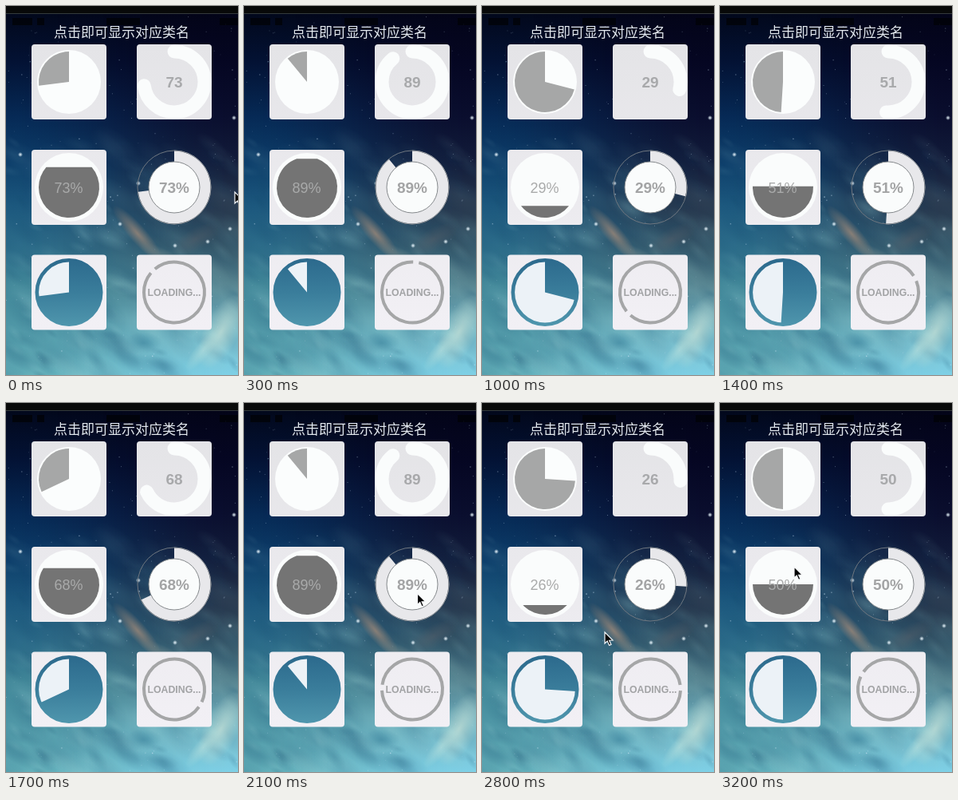
Write an HTML page with a canvas that moves like this. It is 291x462 px and loops after 3.3 s.

```html
<!DOCTYPE html>
<html lang="zh-CN">
<head>
<meta charset="utf-8">
<style>
  html, body { margin: 0; width: 100%; height: 100%; overflow: hidden; background: #04132c; }
  canvas { display: block; }
</style>
</head>
<body>
<canvas id="stage" width="291" height="462"></canvas>
<script>
const W = 291, H = 462, TAU = Math.PI * 2, TOP = -Math.PI / 2, LOOP = 3300;
const SANS = '"Liberation Sans", Arial, sans-serif';
const LEFT = 79, RIGHT = 211, ROWS = [95, 227, 358.5];
const ctx = document.getElementById('stage').getContext('2d');
const sky = document.createElement('canvas');
sky.width = W;
sky.height = H;

// time, progress in percent (unwrapped), spinner gap in degrees (unwrapped)
const GAUGE = [
  [0, 73, 225], [500, 100, 912], [1000, 129, 1576], [1700, 168, 2550],
  [2300, 200, 3320], [2800, 226, 3957], [3200, 250, 4530]
];
// time, pointer tip x, y
const POINTER = [
  [0, 287, 233], [100, 300, 232], [1800, 300, 232], [2000, 225, 238],
  [2200, 210, 239], [2500, 210, 239], [2800, 154, 287], [3200, 93, 205]
];
// y, then red, green, blue at the left edge and at the right edge
const SKY = [
  [10, 2, 8, 28, 3, 4, 24],
  [70, 3, 18, 52, 5, 6, 34],
  [140, 6, 42, 86, 10, 14, 46],
  [195, 13, 62, 106, 18, 28, 58],
  [250, 28, 88, 126, 38, 54, 76],
  [300, 44, 108, 138, 52, 84, 102],
  [350, 64, 134, 152, 88, 134, 146],
  [405, 80, 152, 167, 118, 184, 198],
  [462, 98, 174, 184, 126, 208, 230]
];

function sample(keys, t) {
  let i = 1;
  while (i < keys.length - 1 && keys[i][0] <= t) i++;
  const a = keys[i - 1], b = keys[i];
  const k = Math.min(1, (t - a[0]) / (b[0] - a[0]));
  return a.slice(1).map((v, n) => v + (b[n + 1] - v) * k);
}

function ramp(c, y0, y1, stops) {
  const g = c.createLinearGradient(0, y0, 0, y1);
  stops.forEach(([at, color]) => g.addColorStop(at, color));
  return g;
}

function paintSky() {
  const c = sky.getContext('2d');
  let seed = 11;
  const rnd = () => (seed = seed * 16807 % 2147483647) / 2147483647;

  function glow(x, y, rx, ry, tilt, rgb, alpha) {
    c.save();
    c.translate(x, y);
    c.rotate(tilt);
    c.scale(rx, ry);
    const g = c.createRadialGradient(0, 0, 0, 0, 0, 1);
    g.addColorStop(0, `rgba(${rgb},${alpha})`);
    g.addColorStop(0.5, `rgba(${rgb},${alpha * 0.5})`);
    g.addColorStop(1, `rgba(${rgb},0)`);
    c.fillStyle = g;
    c.fillRect(-1, -1, 2, 2);
    c.restore();
  }

  for (let x = 0; x < W; x++) {
    const u = x / W, k = u * u * (3 - 2 * u);
    c.fillStyle = ramp(c, 0, H, SKY.map(([y, ...v]) =>
      [y / H, `rgb(${[0, 1, 2].map(i => Math.round(v[i] + (v[i + 3] - v[i]) * k))})`]));
    c.fillRect(x, 0, 1, H);
  }

  // mottled clouds, stronger towards the bottom
  for (let i = 0; i < 220; i++) {
    const y = 170 + rnd() * 300, depth = (y - 150) / 320, size = 6 + rnd() * 20;
    glow(rnd() * W, y, size * 1.7, size * 0.7, 0.2 + rnd() * 0.8,
      rnd() < 0.5 ? '150,205,210' : '16,72,108', 0.06 + depth * 0.12);
  }
  glow(165, 285, 46, 11, 0.85, '165,140,122', 0.75);
  glow(205, 318, 45, 10, 0.5, '130,145,142', 0.5);
  glow(238, 292, 34, 14, -0.5, '92,96,104', 0.45);
  glow(172, 422, 24, 14, 0, '62,135,160', 0.6);
  glow(270, 408, 22, 50, 0.45, '205,230,218', 0.7);
  glow(248, 430, 10, 34, 0.7, '190,228,222', 0.5);

  for (let i = 0; i < 210; i++) {
    const x = rnd() * W, y = 12 + rnd() * (H - 14), s = rnd() < 0.15 ? 1.4 : 0.8;
    c.fillStyle = `rgba(205,228,245,${0.15 + rnd() * 0.5})`;
    c.fillRect(x, y, s, s);
  }
  [[286, 140], [281, 279], [212, 300], [143, 273], [166, 222], [253, 295], [18, 186]]
    .forEach(([x, y]) => glow(x, y, 3, 3, 0, '235,248,255', 1));

  c.fillStyle = '#080909';
  c.fillRect(0, 0, W, 9);
  c.fillStyle = '#343a3c';
  c.fillRect(0, 9, W, 1);
  c.fillStyle = 'rgba(0,2,6,.75)';
  [[8, 25], [39, 9], [126, 42], [268, 23]].forEach(([x, w]) => c.fillRect(x, 15, w, 9));
}

function card(x, y) {
  box(x - 47, y - 47, 94, 94, ramp(ctx, 48, 405, [[0, '#e4e4e7'], [1, '#f2f0f5']]));
}

function box(x, y, w, h, color) {
  ctx.beginPath();
  ctx.roundRect(x, y, w, h, 4);
  ctx.fillStyle = color;
  ctx.fill();
}

function disc(x, y, r, color) {
  ctx.beginPath();
  ctx.arc(x, y, r, 0, TAU);
  ctx.fillStyle = color;
  ctx.fill();
}

function sector(x, y, r, from, to, color) {
  ctx.beginPath();
  ctx.moveTo(x, y);
  ctx.arc(x, y, r, from, to);
  ctx.closePath();
  ctx.fillStyle = color;
  ctx.fill();
}

function arc(x, y, r, from, to, width, color, cap = 'butt') {
  ctx.beginPath();
  ctx.arc(x, y, r, from, to);
  ctx.lineWidth = width;
  ctx.lineCap = cap;
  ctx.strokeStyle = color;
  ctx.stroke();
}

function label(text, x, baseline, font, color) {
  ctx.font = font;
  ctx.textAlign = 'center';
  ctx.fillStyle = color;
  ctx.fillText(text, x, baseline);
}

function pie(x, y, end) {
  card(x, y);
  disc(x, y, 40, '#fbfdfd');
  sector(x, y, 38, end, TOP + TAU, '#a6a7a7');
}

function loop(x, y, end, percent) {
  card(x, y);
  arc(x, y, 38, TOP, end + 0.001, 17, '#fafcfc', 'round');
  label(percent, x, y + 7, `bold 19px ${SANS}`, '#a8a9ab');
}

function ball(x, y, p, percent) {
  card(x, y);
  disc(x, y, 43, '#fafcfc');
  ctx.beginPath();
  ctx.arc(x, y, 38, Math.PI * (0.5 - p), Math.PI * (0.5 + p));
  ctx.fillStyle = '#747474';
  ctx.fill();
  label(percent + '%', x - 0.5, y + 6.5, `18px ${SANS}`, '#a9aaaa');
}

function pieLoop(x, y, end, percent) {
  arc(x, y, 46, 0, TAU, 1, '#6f7780');
  sector(x, y, 45.5, TOP, end, '#e8e8eb');
  arc(x, y, 46, TOP, end, 1, '#8d9298');
  disc(x, y, 32, '#fafcfc');
  arc(x, y, 32, 0, TAU, 1, '#85898c');
  label(percent + '%', x, y + 7, `bold 19px ${SANS}`, '#a3a4a5');
}

function transparentPie(x, y, end) {
  card(x, y);
  const blue = ramp(ctx, y - 42, y + 42, [[0, '#2c6a8d'], [0.5, '#3a7d9b'], [1, '#4f96ad']]);
  disc(x, y, 39, '#ecf2f7');
  arc(x, y, 40.2, 0, TAU, 4.6, blue);
  sector(x, y, 39, TOP, end, blue);
}

function spinner(x, y, degrees) {
  card(x, y);
  const gap = degrees * Math.PI / 180, half = 0.03 * Math.PI;
  arc(x, y, 38, gap + half, gap - half + TAU, 4, '#a5a6a7');
  label('LOADING...', x, y + 4.5, `bold 12.3px ${SANS}`, '#a2a3a5');
}

function pointer(x, y) {
  ctx.save();
  ctx.translate(x, y);
  ctx.beginPath();
  [[0, 0], [0, 14], [3.2, 11], [5.6, 16.4], [8, 15.4], [5.6, 10.2], [10, 10]]
    .forEach(([px, py]) => ctx.lineTo(px, py));
  ctx.closePath();
  ctx.fillStyle = '#050505';
  ctx.fill();
  ctx.lineWidth = 1.2;
  ctx.strokeStyle = '#f4f6f8';
  ctx.stroke();
  ctx.restore();
}

function draw(now) {
  const t = Math.floor(now % LOOP / 100) * 100;
  const [total, gap] = sample(GAUGE, t);
  const percent = Math.round(total) % 100, p = percent / 100, end = TOP + p * TAU;

  ctx.drawImage(sky, 0, 0);
  label('点击即可显示对应类名', 145, 38.5, '17px "Noto Sans CJK SC", "Noto Sans CJK", sans-serif', '#e4e9ee');
  pie(LEFT, ROWS[0], end);
  loop(RIGHT, ROWS[0], end, percent);
  ball(LEFT, ROWS[1], p, percent);
  pieLoop(RIGHT, ROWS[1], end, percent);
  transparentPie(LEFT, ROWS[2], end);
  spinner(RIGHT, ROWS[2], gap);

  if (t >= 2200 && t < 2700) {
    box(22, 217, 246, 38, 'rgba(240,242,245,.76)');
    label('SDPieLoopProgressView', 144.5, 242, `16px ${SANS}`, '#080808');
  }
  pointer(...sample(POINTER, t));
}

function tick() {
  draw(performance.now());
  requestAnimationFrame(tick);
}

paintSky();
tick();
</script>
</body>
</html>
```
